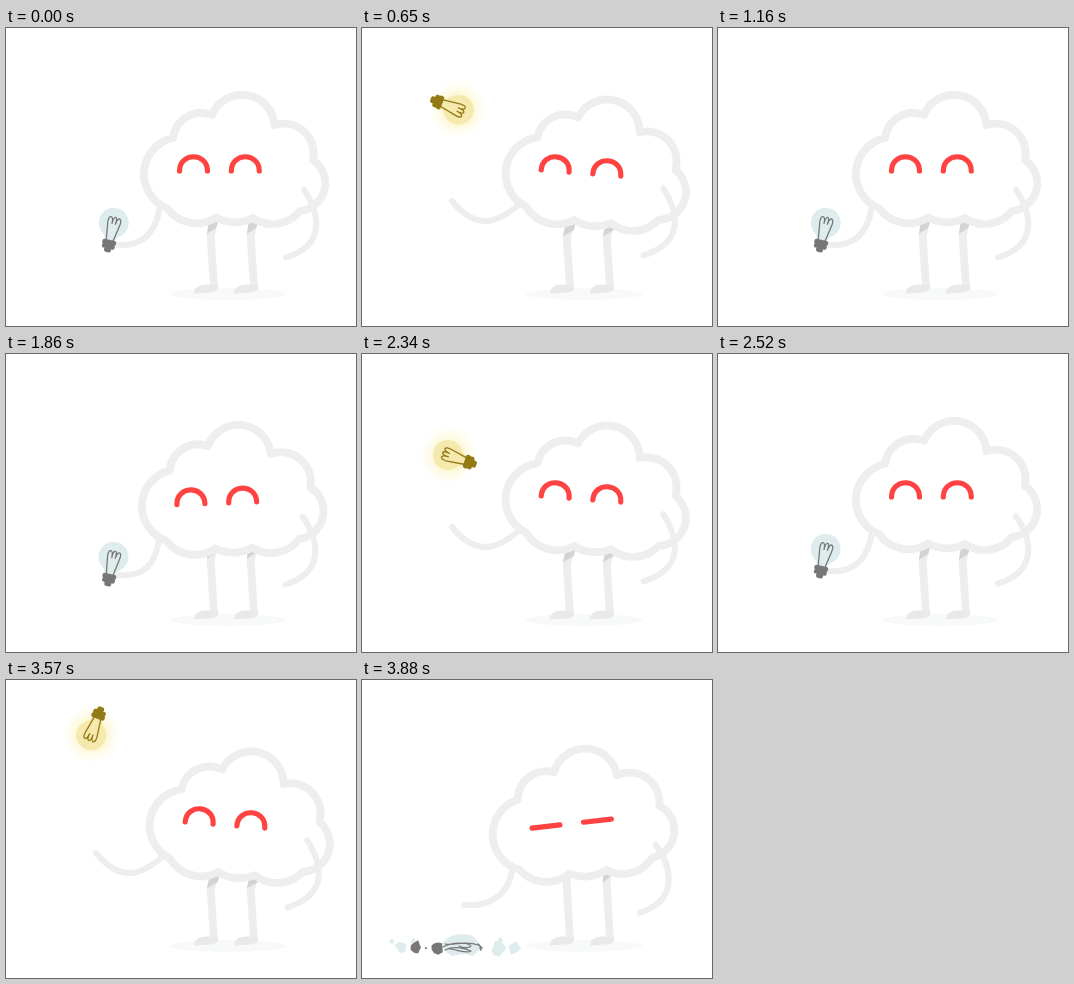
Write an HTML page with a canvas that moves like this. It is 350 by 298 pixels and loops after 6880 ms.

```html
<!DOCTYPE html>
<html lang="en">
<head>
<meta charset="utf-8">
<title>Cloud tossing a light bulb</title>
<style>
  html, body { margin: 0; width: 100%; height: 100%; overflow: hidden; background: #fff; }
  canvas { display: block; width: 350px; height: 298px; }
</style>
</head>
<body>
<canvas id="stage"></canvas>
<script>
const W = 350, H = 298, LOOP = 6880;
const FIRST_TOSS = 500, TOSS_EVERY = 1360, TOSSES = 3, LAST_STEP = 15;

const LINE = '#eeeeee', LEG = '#ededed', FOOT = '#e9e9e9', RED = '#ff4343';
const GLASS = '#dfecee', METAL = '#777777', LIT_GLASS = '#f6e9ae', LIT_METAL = '#937a14';

const canvas = document.getElementById('stage');
const ctx = canvas.getContext('2d');
const ratio = window.devicePixelRatio || 1;
canvas.width = W * ratio;
canvas.height = H * ratio;

// x, y, tilt move the cloud; the limbs follow it.
const REST = { x: 0, y: 0, tilt: 0, faceX: 213.4, faceY: 143, handX: 111, handY: 217, smile: 1 };
const CROUCH = { x: -2.5, y: 4.3, tilt: -2, faceX: 210.8, faceY: 149.3, handX: 112, handY: 221, smile: 1 };
const REACH = { x: 6.5, y: 4, tilt: 4.4, faceX: 219, faceY: 145, handX: 90, handY: 173, smile: 1 };
const SAD = { x: -9, y: 2.5, tilt: -6.5, faceX: 209.7, faceY: 143.6, handX: 102, handY: 225, smile: 0 };

const clamp = (v, low = 0, high = 1) => Math.max(low, Math.min(high, v));
const ramp = (from, to, v) => {
  const u = clamp((v - from) / (to - from));
  return u * u * (3 - 2 * u);
};

// Slow motion around the highest point of the flight
const holdOf = step => step >= 5 && step <= 7 ? 100 : 30;

function stateAt(t) {
  const toss = clamp(Math.floor((t - FIRST_TOSS) / TOSS_EVERY), 0, TOSSES - 1);
  let left = t - FIRST_TOSS - toss * TOSS_EVERY;
  if (left < 0) return { step: LAST_STEP, miss: false };
  let step = 0;
  while (step < LAST_STEP && left >= holdOf(step)) left -= holdOf(step++);
  return { step, miss: toss === TOSSES - 1 };
}

function weightsAt(step, miss) {
  const rise = ramp(2, 5, step);
  if (miss && step > 9) {
    const sad = ramp(9, 14, step);
    return { crouch: 0, reach: 1 - sad, sad };
  }
  const fall = ramp(9, 11.5, step);
  return { crouch: 1 - rise + fall * (1 - ramp(12, 15, step)), reach: rise * (1 - fall), sad: 0 };
}

function blend({ crouch, reach, sad }) {
  const pose = {};
  for (const key in REST) {
    const from = part => part[key] - REST[key];
    pose[key] = REST[key] + crouch * from(CROUCH) + reach * from(REACH) + sad * from(SAD);
  }
  return pose;
}

function bulbAt(step, miss, crouch) {
  const flight = 44 + 6.9 * (step - 7) + 11.8 * (step - 7) ** 2;
  const lowest = miss && step > 9 ? 252 : 206.5 + 8 * crouch;
  return {
    x: 105 - 19.5 * ramp(2, 5, step) * (1 - ramp(5, 12, step)),
    y: Math.min(flight, lowest),
    angle: clamp(111 + 44.5 * (step - 5), 12, 373),
    lit: ramp(1, 4, step) * (1 - ramp(11, 14, step))
  };
}

function stroke(path, color, width, cap = 'round') {
  ctx.strokeStyle = color;
  ctx.lineWidth = width;
  ctx.lineCap = cap;
  ctx.lineJoin = 'round';
  ctx.stroke(new Path2D(path));
}

function fill(path, color) {
  ctx.fillStyle = color;
  ctx.fill(new Path2D(path));
}

function placed(x, y, degrees, draw) {
  ctx.save();
  ctx.translate(x, y);
  ctx.rotate(degrees * Math.PI / 180);
  draw();
  ctx.restore();
}

const CENTER_X = 228.5, CENTER_Y = 133.5;
const CLOUD = 'M161,180 A36.7,36.7 0 0 1 167,110 A28.5,28.5 0 0 1 206,87 A32.5,32.5 0 0 1 268.5,97' +
  'A30,30 0 0 1 307,132 A28,28 0 0 1 294,183 A35,35 0 0 1 247,190 A40,40 0 0 1 210,189.5 A36,36 0 0 1 161,180Z';

function drawLeftArm({ x, y, tilt, handX, handY }) {
  const a = tilt * Math.PI / 180, dx = -74.5, dy = 44.5;
  const shoulderX = CENTER_X + x + dx * Math.cos(a) - dy * Math.sin(a);
  const shoulderY = CENTER_Y + y + dx * Math.sin(a) + dy * Math.cos(a);
  const sag = .62 * Math.max(0, REST.handY - handY);
  stroke(`M${shoulderX},${shoulderY} C${shoulderX - 4 - .7 * sag},${shoulderY + 28 - .3 * sag} ` +
    `${handX + 24},${handY + 2 + sag} ${handX},${handY}`, LINE, 6);
}

function drawRightArm({ x, tilt }) {
  const near = x / 2, far = x / 4;
  stroke(`M${298 + near},${162 - .4 * tilt} C${314 + near},186 ${320 + far},${217 - tilt / 2} ` +
    `${280 + far},${229.5 - tilt / 2}`, LINE, 6);
}

function drawLeg({ x, tilt }, shift) {
  const hipX = 208 + x / 4, kneeY = 208 + tilt / 2;
  placed(shift, 0, 0, () => {
    stroke(`M${hipX},192 L204.7,${kneeY} L208,260`, LEG, 7.8, 'butt');
    fill(`M${hipX - 5},192 H${hipX + 5} L${hipX + 2},${kneeY - 8} L200.8,${kneeY - 2}Z`, '#d3d3d3');
    fill('M188,265.5 C188,259 194,256 202,256.5 L212,257 V261 Q211,264 204,264.5Z', FOOT);
  });
}

function drawFace({ faceX, faceY, tilt, smile }) {
  const lift = 19 * smile;
  placed(faceX, faceY, tilt, () => {
    for (const x of [-25.9, 25.9]) {
      stroke(`M${x - 14},0 C${x - 14},${-lift} ${x + 14},${-lift} ${x + 14},0`, RED, 5.2);
    }
  });
}

function drawBody(pose) {
  ctx.fillStyle = '#f8f9f9';
  ctx.beginPath();
  ctx.ellipse(222, 266, 58.5, 6, 0, 0, 2 * Math.PI);
  ctx.fill();
  drawLeftArm(pose);
  drawLeg(pose, 0);
  drawLeg(pose, 40);
  placed(CENTER_X + pose.x, CENTER_Y + pose.y, pose.tilt, () => {
    ctx.translate(-CENTER_X, -CENTER_Y);
    fill(CLOUD, '#fff');
    stroke(CLOUD, LINE, 7.8);
  });
  drawFace(pose);
  drawRightArm(pose);
}

function drawBulbParts(glass, metal) {
  fill('M-5,7 Q-5,3 -8.6,.3 A15,15 0 1 1 8.6,.3 Q5,3 5,7Z', glass);
  stroke('M-3.5,6 L-6,-12 C-6.5,-19 -1.5,-20 -1.5,-11 C-1.5,-20 3.5,-20 2,-11 C3,-20 8,-18 6.5,-11 L3.5,6', metal, 1.3);
  ctx.fillStyle = metal;
  ctx.beginPath();
  for (const [y, width] of [[5.5, 14], [9.5, 13], [13, 7]]) {
    ctx.roundRect(-width / 2, y, width, 5, 2);
  }
  ctx.fill();
}

function drawBulb({ x, y, angle, lit }) {
  placed(x, y, angle, () => {
    if (lit < 1) drawBulbParts(GLASS, METAL);
    if (lit > 0) {
      ctx.globalAlpha = lit;
      const glow = ctx.createRadialGradient(0, -11, 10, 0, -11, 30);
      glow.addColorStop(0, 'rgba(250,236,150,.6)');
      glow.addColorStop(.5, 'rgba(252,242,180,.3)');
      glow.addColorStop(1, 'rgba(255,250,220,0)');
      ctx.fillStyle = glow;
      ctx.fillRect(-32, -43, 64, 64);
      drawBulbParts(LIT_GLASS, LIT_METAL);
    }
  });
}

function seeded(seed) {
  return () => {
    seed = (seed * 16807) % 2147483647;
    return seed / 2147483647;
  };
}

function jagged(size, random) {
  const corners = 9;
  const points = Array.from({ length: corners }, (_, k) => {
    const a = k / corners * 2 * Math.PI, r = size * (.55 + .6 * random());
    return `${r * Math.cos(a)},${r * Math.sin(a)}`;
  });
  return `M${points.join(' L')}Z`;
}

function drawPieces(spread) {
  const random = seeded(77);
  const piece = (x, y, size, color) => {
    const away = x - 100, hop = spread * (1 - spread) * Math.abs(away);
    placed(100 + away * spread, y - hop, (1 - spread) * away * 2, () => fill(jagged(size, random), color));
  };
  for (const x of [40, 136, 153]) piece(x, 268, 7.5, GLASS);
  for (const x of [30, 51, 138]) piece(x, 260 + 4 * random(), 3, GLASS);
  for (const x of [55, 75]) piece(x, 267.5, 6.5, METAL);
  piece(64, 268, 1.3, METAL);
  placed(100, 265, (1 - spread) * 20, () => {
    fill('M-20,-2 Q-12,-11 0,-11 Q10,-11 14,-6 L19,3 L11,11 L2,9 L-10,11 L-16,7Z', GLASS);
    stroke('M-19,2 C-8,-4 4,-2 8,0 C11,2 4,4 -3,1 M-17,5 C-7,0 5,4 9,6 C6,9 -4,5 -12,4 M-17,-1 C-8,1 3,-5 16,0', METAL, 1.2);
    stroke('M16,-1 L20,3 M18,3 L19,5', METAL, 1.6);
  });
}

function render(t) {
  const { step, miss } = stateAt(t);
  const weights = weightsAt(step, miss);
  ctx.setTransform(ratio, 0, 0, ratio, 0, 0);
  ctx.fillStyle = '#fff';
  ctx.fillRect(0, 0, W, H);
  drawBody(blend(weights));
  if (miss && step > 11) {
    const u = (step - 11) / 4;
    drawPieces(u * (2 - u));
  } else {
    drawBulb(bulbAt(step, miss, weights.crouch));
  }
}

const begin = performance.now();
function tick() {
  render((performance.now() - begin) % LOOP);
  requestAnimationFrame(tick);
}
tick();
</script>
</body>
</html>
```
